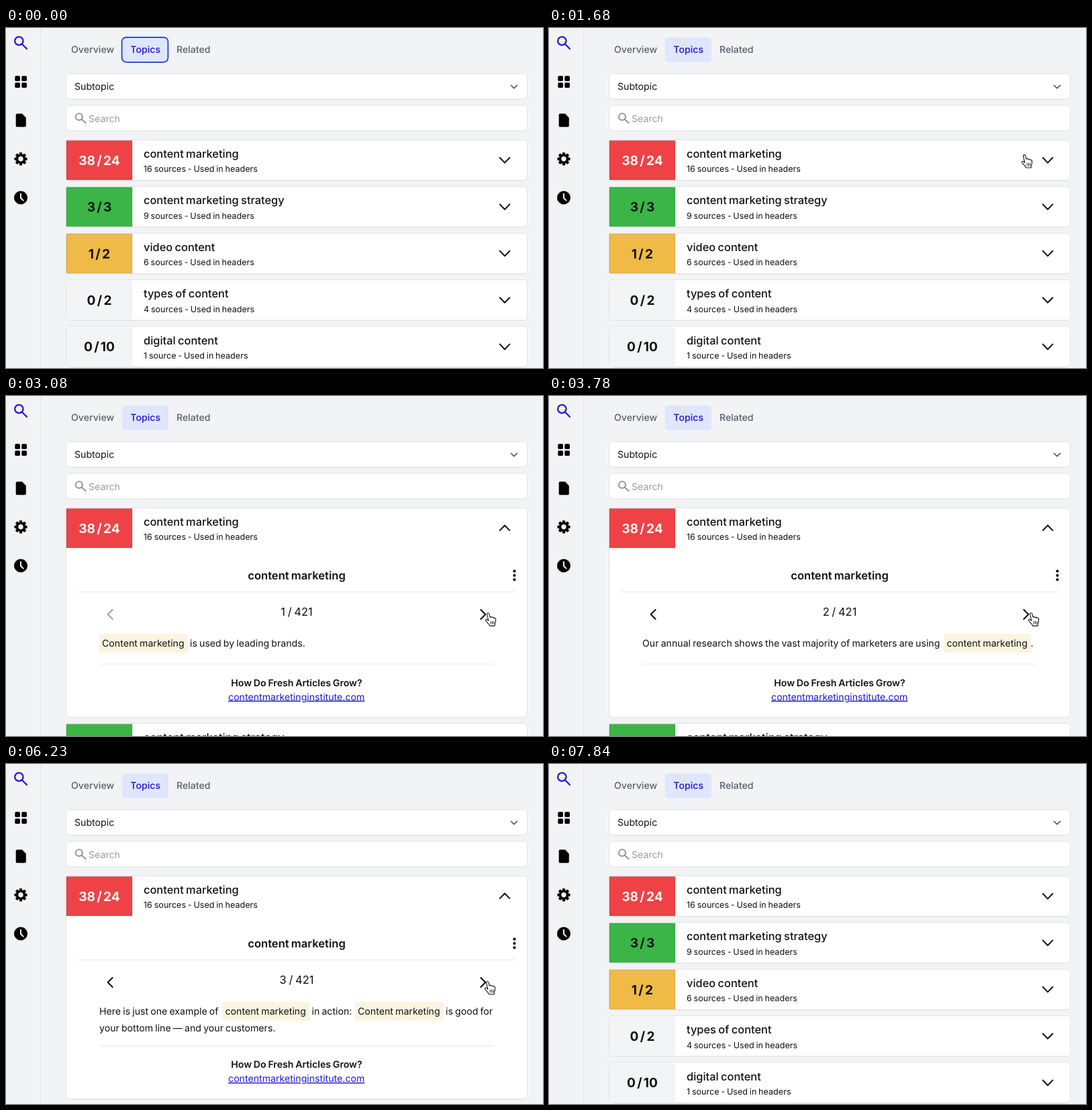
Animation, 800 px wide and 506 px high, one loop 8330 ms. Source, as an HTML page:

```html
<!DOCTYPE html>
<html lang="en">
<head>
<meta charset="utf-8">
<title>Topic list</title>
<style>
  html, body { margin: 0; width: 100%; height: 100%; overflow: hidden; background: #f2f3f5; }
  svg { display: block; width: 800px; height: 506px; }
  text { font: 14.15px Inter, "Liberation Sans", sans-serif; font-optical-sizing: none; word-spacing: -.06em; text-rendering: geometricPrecision; white-space: pre; }
  .tab { font-weight: 500; fill: #585f6b; }
  .title { font-size: 16.4px; font-weight: 500; }
  .head { font-size: 16.6px; font-weight: 600; }
  .small { font-size: 12.6px; }
  .score { font-size: 19.2px; font-weight: 700; word-spacing: -.12em; }
  .page { font-size: 16.5px; }
  .strong { font-weight: 600; }
  .mid { text-anchor: middle; }
  .link { fill: #2014d9; text-decoration: underline; }
  .line { fill: none; stroke: #111; stroke-width: 2; stroke-linecap: round; stroke-linejoin: round; }
</style>
</head>
<body>
<svg viewBox="0 0 800 506">
  <g id="side"></g>
  <g id="tabs"></g>
  <g id="form"></g>
  <g id="list"></g>
  <g id="hand" stroke="#111" stroke-width="1.1" stroke-linejoin="round" stroke-linecap="round">
    <path fill="#fff" d="M-1.7 1.2C-1.7-.6 1.2-.9 1.6 .9L2.9 6C3.5 4.8 5.6 5.2 5.9 6.5C6.8 5.6 8.4 6 8.7 7.3C9.8 6.7 11.3 7.3 11.4 8.9C11.7 12 11.3 13.5 10 16V18.8H2.5C2 16.5-1 14.5-3.3 11.5C-4.6 9.7-2.7 8.3-1.2 9.6L.6 11.2Z"/>
    <path fill="none" stroke-width=".9" d="M4 12v4M6.3 12v4M8.6 12v4"/>
  </g>
</svg>
<script>
const LOOP = 8330, STEP = 70, GREY = '#f3f4f6';
const $ = id => document.getElementById(id);
const text = (x, y, s, cls = '', fill = '#111') =>
  `<text x="${x}" y="${y}" class="${cls}" fill="${fill}">${s}</text>`;
const rect = (x, y, w, h, fill, more = '') =>
  `<rect x="${x}" y="${y}" width="${w}" height="${h}" fill="${fill}" ${more}/>`;
const line = (d, more = '') => `<path class="line" d="${d}" style="${more}"/>`;
const rule = (x1, x2, y) => rect(x1, y - .5, x2 - x1, 1, '#e8e8ea');
const card = (y, h) =>
  rect(90, y + 1, 686, h, '#e3e5e8', 'rx="5"') +
  rect(89.5, y, 687, h, '#fff', 'rx="5" stroke="#e1e3e7"');
const lens = (x, y, r, end, color, width) =>
  `<g fill="none" stroke="${color}" stroke-width="${width}" stroke-linecap="round">
    <circle cx="${x}" cy="${y}" r="${r}"/><path d="M${x + r * .72} ${y + r * .72}L${end}"/></g>`;

const topics = [
  ['38 / 24', 'content marketing', '16 sources', '#ef4246', '#fff'],
  ['3 / 3', 'content marketing strategy', '9 sources', '#3ab546'],
  ['1 / 2', 'video content', '6 sources', '#efba46'],
  ['0 / 2', 'types of content', '4 sources', GREY],
  ['0 / 10', 'digital content', '1 source', GREY],
];

// Text runs: x, line, words, highlight width (if any)
const quotes = [
  [[143, 0, 'Content marketing', 132], [274, 0, 'is used by leading brands.']],
  [[139, 0, 'Our annual research shows the vast majority of marketers are using'],
   [592.5, 0, 'content marketing', 130], [717.5, 0, '.']],
  [[139, 0, 'Here is just one example of'], [326.5, 0, 'content marketing', 130],
   [455.5, 0, 'in action:'], [524, 0, 'Content marketing', 132], [655, 0, 'is good for'],
   [139, 1, 'your bottom line — and your customers.']],
];

function drawSide() {
  let out = rect(51, 0, 1, 506, '#e2e4e8') + lens(19.3, 19.3, 6.2, '31 31', '#2418df', 2.3);
  for (const x of [13.3, 23.3]) for (const y of [71.3, 81.3])
    out += rect(x, y, 7.7, 7.7, '#000', 'rx="1.8"');
  out += '<path d="M16.5 127.5H24L29.8 133.5V145.5Q29.8 147.3 28 147.3H16.5Q14.7 147.3 14.7 145.5V129.3Q14.7 127.5 16.5 127.5Z"/>';
  for (let a = 0; a < 360; a += 45)
    out += rect(-2.1, -9.6, 4.2, 5, '#000', `rx=".8" transform="translate(22 194.8) rotate(${a})"`);
  out += '<circle cx="22" cy="194.8" r="5.5" fill="none" stroke="#000" stroke-width="3.6"/>';
  out += '<circle cx="22" cy="252.5" r="10"/>' + line('M22 247v6l3.6 3.6', 'stroke:#f2f3f5');
  $('side').innerHTML = out;
}

function drawTabs(focus) {
  $('tabs').innerHTML =
    (focus ? rect(172.6, 13.8, 68.8, 37, '#dfe6fd', 'rx="6.5" stroke="#1a3bd0" stroke-width="1.7"')
           : rect(173, 14, 69, 37, '#dfe6fd', 'rx="5.5"')) +
    text(97, 37.3, 'Overview', 'tab') + text(254, 37.3, 'Related', 'tab') +
    `<text x="185.3" y="37.3" class="tab" style="fill:#2014c9">Topics</text>`;
}

function drawForm() {
  $('form').innerHTML =
    card(68, 38) + text(102, 92, 'Subtopic') +
    line('M752.3 85.2l4.6 4.6 4.6-4.6', 'stroke:#374151;stroke-width:1.4') +
    card(115, 38.3) + lens(109, 132.2, 5, '118.8 141.3', '#85888e', 1.8) +
    text(123, 139.5, 'Search', '', '#979ba3');
}

function drawRow([score, name, sources, color, ink = '#111'], y, open, height) {
  const edge = color === GREY ? '' : 'stroke="#000" stroke-opacity=".14"';
  return card(y, height) + rect(90, y + 1, 98, 58.5, color, edge) +
    text(139, y + 37.3, score, 'score mid', ink) +
    text(205, y + 26.5, name, 'title') +
    text(205, y + 47.8, sources + ' - Used in headers', 'small') +
    line(open ? `M735.7 ${y + 33.6}l7.3-7.6 7.3 7.6` : `M735.7 ${y + 26.5}l7.3 7.6 7.3-7.6`);
}

function drawDetail(page, extra) {
  let out = text(433, 272.5, 'content marketing', 'head mid') + rule(106, 760, 291.5) +
    [260.7, 267, 273.3].map(y => `<circle cx="757.4" cy="${y}" r="2.1"/>`).join('') +
    line('M158.7 318l-7 7 7 7', page > 1 ? '' : 'stroke:#a0a2a6') +
    line('M707.3 318l7 7-7 7') +
    text(433, 326.7, page + ' / 421', 'page mid');
  for (const [x, row, words, mark] of quotes[page - 1]) {
    if (mark) out += rect(x - 4, 354, mark, 28, '#faf5e0');
    out += text(x, 373.2 + row * 24.6, words);
  }
  return out + rule(139, 727, 399 + extra) +
    text(433, 431.7 + extra, 'How Do Fresh Articles Grow?', 'strong mid') +
    text(432.7, 452.5 + extra, 'contentmarketinginstitute.com', 'link mid');
}

function drawList(page) {
  const extra = page === 3 ? 20.5 : 0;
  const shift = page ? 251.5 + extra : 0;
  $('list').innerHTML = topics.map((topic, i) =>
    drawRow(topic, 166.5 + 69.4 * i + (i ? shift : 0), page && !i, i ? 60.2 : 60.2 + shift)
  ).join('') + (page ? drawDetail(page, extra) : '');
}

// Pointer tip: time, x, y
const path = [
  [210, 812, 300], [770, 707.2, 187.3], [1400, 707.2, 187.3], [1680, 708.2, 189.2],
  [2310, 708.2, 189.2], [2940, 718.2, 323.3], [4900, 718.2, 323.3], [5180, 717.2, 324],
  [6370, 717.2, 324], [6860, 708.2, 189], [7210, 708.2, 189], [7700, 640, 525],
];

function pointer(t) {
  const next = path.findIndex(k => k[0] > t);
  if (next < 1) return next ? path[path.length - 1].slice(1) : path[0].slice(1);
  const [t0, x0, y0] = path[next - 1], [t1, x1, y1] = path[next];
  const p = (t - t0) / (t1 - t0), e = p * p * (3 - 2 * p);
  return [x0 + (x1 - x0) * e, y0 + (y1 - y0) * e];
}

const pageAt = t => t < 1820 || t >= 7070 ? 0 : t < 3640 ? 1 : t < 5320 ? 2 : 3;

let shownPage, shownFocus;
function frame() {
  const t = Math.floor(performance.now() % LOOP / STEP) * STEP;
  const page = pageAt(t), focus = t < 350;
  if (page !== shownPage) drawList(shownPage = page);
  if (focus !== shownFocus) drawTabs(shownFocus = focus);
  $('hand').setAttribute('transform', `translate(${pointer(t)})`);
  requestAnimationFrame(frame);
}

drawSide();
drawForm();
frame();
</script>
</body>
</html>
```
